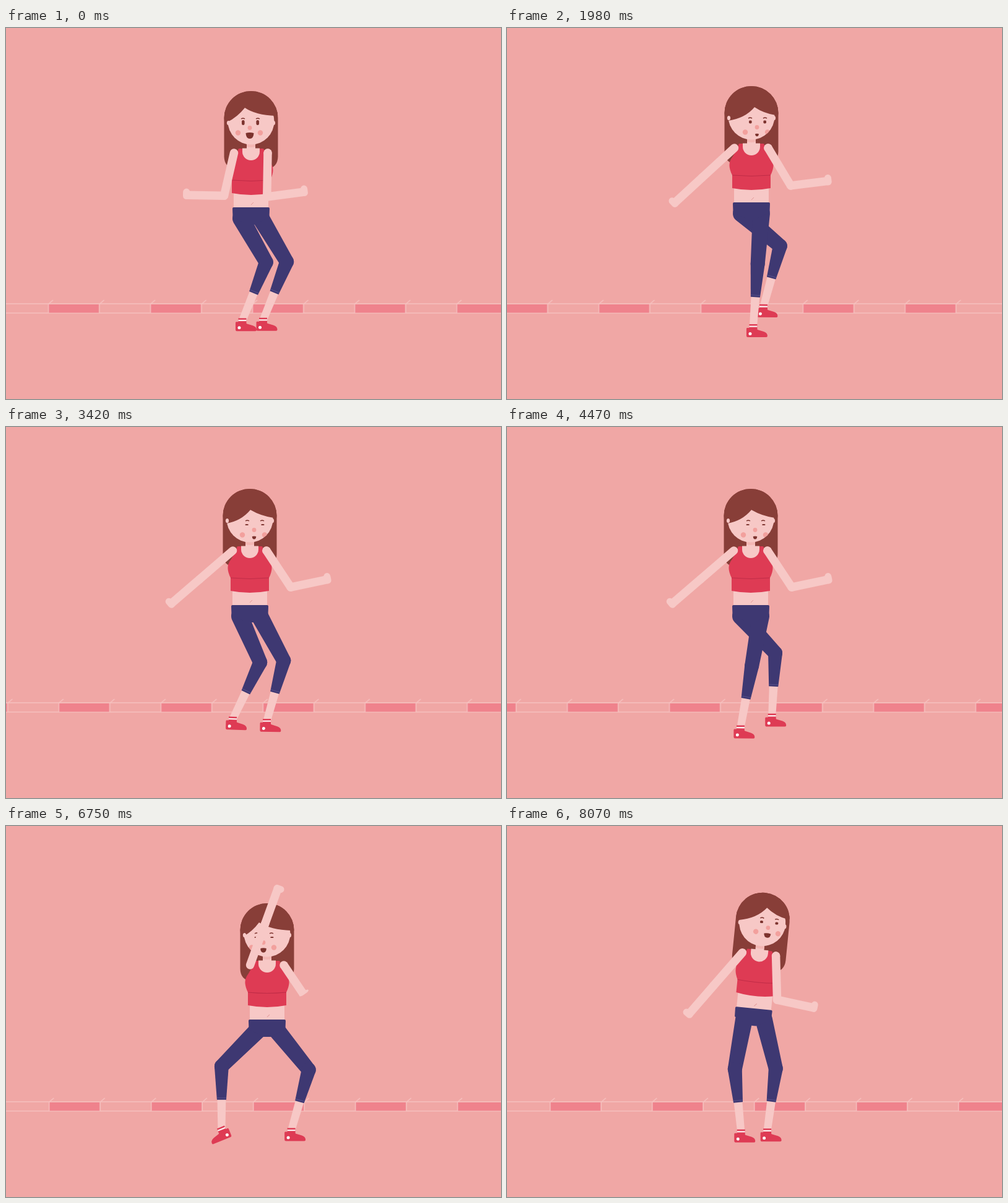
Write an HTML page without scripts that moves like this. It is 800x600 px and loops after 8100 ms.

```html
<!DOCTYPE html>
<html lang="en">
<head>
<meta charset="utf-8">
<title>Street dance</title>
<style>
html, body { margin: 0; width: 100%; height: 100%; overflow: hidden; background: #f0a7a5; }
svg { display: block; width: 100vw; height: 100vh; }
.skin { fill: #f7c8c6; }
.hair { fill: #883e38; }
.red { fill: #de3b54; }
.navy { fill: #3e3872; }
.blush { fill: #f2a09d; }
.dark { fill: #7c332e; }
.limb { fill: none; stroke: #f7c8c6; stroke-width: 13.5; stroke-linecap: round; }
.fist { stroke-width: 11; }
.kerb { fill: none; stroke: #f6c1bf; stroke-width: 1.5; }

.road, .body, .torso, .face, .eyes, .mouth, .fringe,
.armL, .foreL, .armR, .foreR,
.thighL, .shinL, .footL, .thighR, .shinR, .footR { animation: 8100ms linear infinite; }
.body, .torso, .face, .eyes, .mouth, .fringe,
.armL, .foreL, .armR, .foreR { animation-timing-function: ease-in-out; }

.road { animation-name: road; }
.body { animation-name: body; }
.torso { animation-name: torso; }
.face { animation-name: face; }
.eyes { animation-name: eyes; }
.mouth { animation-name: mouth; }
.fringe { animation-name: fringe; }
.armL { animation-name: armL; }
.foreL { animation-name: foreL; }
.armR { animation-name: armR; }
.foreR { animation-name: foreR; }
.thighL { animation-name: thighL; }
.shinL { animation-name: shinL; }
.footL { animation-name: footL; }
.thighR { animation-name: thighR; }
.shinR { animation-name: shinR; }
.footR { animation-name: footR; }

@keyframes road {
  0% { translate: 0 0; }
  5.2% { translate: -1.5px 0; }
  10.4% { translate: -7px 0; }
  15.6% { translate: -25px 0; }
  20.7% { translate: -55px 0; }
  24.44% { translate: -85px 0; }
  28.9% { translate: -132px 0; }
  33.3% { translate: -188px 0; }
  37.8% { translate: -250px 0; }
  42.22% { translate: -313px 0; }
  46.7% { translate: -373px 0; }
  51% { translate: -425px 0; }
  55.19% { translate: -466px 0; }
  58.8% { translate: -485px 0; }
  62.6%, to { translate: -493.8px 0; }
}

/* walk cycle: contact, lift, reach, then the same on the other side */
@keyframes body {
  0%, 10.55% { translate: 396px 290px; }
  5.2% { translate: 396px 297px; }
  12.85%, 22.64%, 32.43%, 42.22%, 52.01%, 61.8% { translate: 394px 288px; }
  14.65%, 24.44%, 34.23%, 44.02%, 53.81% { translate: 395px 282px; }
  16.02%, 25.81%, 35.6%, 45.4%, 55.19% { translate: 394px 288px; }
  17.75%, 27.54%, 37.33%, 47.12%, 56.91% { translate: 394px 288px; }
  19.51%, 29.3%, 39.09%, 48.88%, 58.67% { translate: 395px 282px; }
  20.92%, 30.71%, 40.5%, 50.29%, 60.08% { translate: 394px 288px; }
  68.15%, 75.7% { translate: 414px 326px; }
  83.33% { translate: 422px 313px; }
  93.4% { translate: 411px 280px; }
  99.63%, to { translate: 399px 295px; }
}
@keyframes thighL {
  0%, 10.55% { rotate: -29.8deg; }
  5.2% { rotate: 12deg; }
  12.85%, 22.64%, 32.43%, 42.22%, 52.01%, 61.8% { rotate: -23.5deg; }
  14.65%, 24.44%, 34.23%, 44.02%, 53.81% { rotate: -50deg; }
  16.02%, 25.81%, 35.6%, 45.4%, 55.19% { rotate: -43deg; }
  17.75%, 27.54%, 37.33%, 47.12%, 56.91% { rotate: -34deg; }
  19.51%, 29.3%, 39.09%, 48.88%, 58.67% { rotate: -7deg; }
  20.92%, 30.71%, 40.5%, 50.29%, 60.08% { rotate: 0deg; }
  68.15%, 75.7% { rotate: 56deg; }
  83.33% { rotate: 45deg; }
  93.4% { rotate: 15deg; }
  99.63%, to { rotate: 10.4deg; }
}
@keyframes shinL {
  0%, 10.55% { rotate: 52deg; }
  5.2% { rotate: -21deg; }
  12.85%, 22.64%, 32.43%, 42.22%, 52.01%, 61.8% { rotate: 49.3deg; }
  14.65%, 24.44%, 34.23%, 44.02%, 53.81% { rotate: 65.4deg; }
  16.02%, 25.81%, 35.6%, 45.4%, 55.19% { rotate: 46deg; }
  17.75%, 27.54%, 37.33%, 47.12%, 56.91% { rotate: 34deg; }
  19.51%, 29.3%, 39.09%, 48.88%, 58.67% { rotate: 0deg; }
  20.92%, 30.71%, 40.5%, 50.29%, 60.08% { rotate: 0deg; }
  68.15%, 75.7% { rotate: -64deg; }
  83.33% { rotate: -45deg; }
  93.4% { rotate: -21deg; }
  99.63%, to { rotate: -16deg; }
}
@keyframes footL {
  0%, 10.55% { rotate: -22.2deg; }
  5.2% { rotate: 9deg; }
  12.85%, 22.64%, 32.43%, 42.22%, 52.01% { rotate: -24deg; }
  14.65%, 24.44%, 34.23%, 44.02%, 53.81% { rotate: -15deg; }
  16.02%, 25.81%, 35.6%, 45.4%, 55.19% { rotate: -3deg; }
  17.75%, 27.54%, 37.33%, 47.12%, 56.91% { rotate: 0deg; }
  19.51%, 29.3%, 39.09%, 48.88%, 58.67% { rotate: 7deg; }
  20.92%, 30.71%, 40.5%, 50.29%, 60.08% { rotate: 0deg; }
  61.8% { rotate: -24deg; scale: 1 1; }
  68.15%, 75.7% { rotate: -14deg; scale: -1 1; }
  83.33% { rotate: -22deg; scale: -1 1; }
  93.4% { rotate: 6deg; scale: 1 1; }
  99.63%, to { rotate: 5.5deg; scale: 1 1; }
}
@keyframes thighR {
  0%, 10.55% { rotate: -30.8deg; }
  5.2% { rotate: -14.5deg; }
  12.85%, 22.64%, 32.43%, 42.22%, 52.01%, 61.8% { rotate: -28.7deg; }
  14.65%, 24.44%, 34.23%, 44.02%, 53.81% { rotate: 4deg; }
  16.02%, 25.81%, 35.6%, 45.4%, 55.19% { rotate: 10.2deg; }
  17.75%, 27.54%, 37.33%, 47.12%, 56.91% { rotate: -4deg; }
  19.51%, 29.3%, 39.09%, 48.88%, 58.67% { rotate: -40deg; }
  20.92%, 30.71%, 40.5%, 50.29%, 60.08% { rotate: -36deg; }
  68.15%, 75.7% { rotate: -50.5deg; }
  83.33% { rotate: -39deg; }
  93.4% { rotate: -14deg; }
  99.63%, to { rotate: -13.7deg; }
}
@keyframes shinR {
  0%, 10.55% { rotate: 52.8deg; }
  5.2% { rotate: 21deg; }
  12.85%, 22.64%, 32.43%, 42.22%, 52.01%, 61.8% { rotate: 44.3deg; }
  14.65%, 24.44%, 34.23%, 44.02%, 53.81% { rotate: 0deg; }
  16.02%, 25.81%, 35.6%, 45.4%, 55.19% { rotate: 0deg; }
  17.75%, 27.54%, 37.33%, 47.12%, 56.91% { rotate: 37.6deg; }
  19.51%, 29.3%, 39.09%, 48.88%, 58.67% { rotate: 70deg; }
  20.92%, 30.71%, 40.5%, 50.29%, 60.08% { rotate: 54deg; }
  68.15%, 75.7% { rotate: 68deg; }
  83.33% { rotate: 55deg; }
  93.4% { rotate: 21deg; }
  99.63%, to { rotate: 21.4deg; }
}
@keyframes footR {
  0%, 10.55% { rotate: -22deg; }
  5.2% { rotate: -6.5deg; }
  12.85%, 22.64%, 32.43%, 42.22%, 52.01%, 61.8% { rotate: -15deg; }
  14.65%, 24.44%, 34.23%, 44.02%, 53.81% { rotate: -4deg; }
  16.02%, 25.81%, 35.6%, 45.4%, 55.19% { rotate: -10deg; }
  17.75%, 27.54%, 37.33%, 47.12%, 56.91% { rotate: -31deg; }
  19.51%, 29.3%, 39.09%, 48.88%, 58.67% { rotate: -28deg; }
  20.92%, 30.71%, 40.5%, 50.29%, 60.08% { rotate: -18deg; }
  68.15%, 75.7% { rotate: -17.5deg; }
  83.33% { rotate: -16deg; }
  93.4% { rotate: -7deg; }
  99.63%, to { rotate: -7.7deg; }
}

@keyframes torso {
  0%, 83.33% { rotate: 0deg; }
  93.4% { rotate: 2deg; }
  99.63%, to { rotate: 5.7deg; }
}
@keyframes armL {
  0% { rotate: 13deg; }
  5.2% { rotate: 30deg; }
  10.55% { rotate: 180deg; }
  20.9%, 24.44% { rotate: 47.4deg; }
  42.22%, 61.8% { rotate: 49.3deg; }
  68.15% { rotate: 162.8deg; }
  75.7% { rotate: 136deg; }
  83.33% { rotate: 199.9deg; }
  87.7% { rotate: 100deg; }
  90.5% { rotate: 60deg; }
  93.4% { rotate: 20deg; }
  99.63%, to { rotate: 35.3deg; }
}
@keyframes foreL {
  0% { rotate: 78deg; }
  5.2% { rotate: 50deg; }
  10.55%, 83.33% { rotate: 0deg; }
  87.7% { rotate: 70deg; }
  90.5% { rotate: 90deg; }
  93.4% { rotate: 75deg; }
  99.63%, to { rotate: 0deg; }
}
@keyframes armR {
  0% { rotate: 1deg; }
  10.55% { rotate: -10deg; }
  20.9%, 24.44% { rotate: -31deg; }
  42.22% { rotate: -33.5deg; }
  61.8% { rotate: -33.5deg; scale: 1 1; }
  68.15%, 75.7% { rotate: 18deg; scale: 1 .3; }
  83.33% { rotate: -34deg; scale: 1 .42; }
  86% { scale: 1 1; }
  93.4% { rotate: -180deg; }
  99.63%, to { rotate: -7.3deg; scale: 1 1; }
}
@keyframes foreR {
  0% { rotate: -98.5deg; }
  10.55% { rotate: -110deg; }
  20.9%, 24.44% { rotate: -66deg; }
  42.22%, 61.8% { rotate: -68.5deg; }
  68.15%, 93.4% { rotate: 0deg; }
  96.5% { rotate: -5deg; }
  99.63%, to { rotate: -76.2deg; }
}

@keyframes face {
  0%, 10.55% { translate: -1px -7px; }
  20.9%, 24.44% { translate: 10px 0; }
  42.22%, 61.8% { translate: 8px 0; }
  68.15%, 75.7% { translate: 9.5px -1.5px; }
  83.33% { translate: -5px -3px; }
  99.63%, to { translate: 10.8px -10.5px; }
}
@keyframes eyes {
  0%, 10.55% { scale: 1 1; }
  20.9%, 24.44% { scale: 1 .6; }
  42.22%, 61.8% { scale: 1.1 .23; }
  68.15%, 83.33% { scale: 1.1 .27; }
  99.63%, to { scale: 1.05 .5; }
}
@keyframes mouth {
  0%, 10.55% { scale: 1; }
  20.9%, 24.44% { scale: .45; }
  42.22%, 61.8% { scale: .5; }
  68.15%, 75.7% { scale: .42; }
  83.33% { scale: .75; }
  99.63%, to { scale: .85 .75; }
}
@keyframes fringe {
  0%, 10.55% { d: path("M-50-138H-38Q-22-146-10-161Q8-149 39-148H50V-200H-50Z"); }
  20.9%, 24.44% { d: path("M-50-132H-38Q-10-136 5-154Q20-144 39-141H50V-200H-50Z"); }
  42.22%, 61.8% { d: path("M-50-132H-38Q-14-136 1-154Q18-144 39-141H50V-200H-50Z"); }
  68.15%, 75.7% { d: path("M-50-132H-38Q-11-137 4-155Q20-144 39-141H50V-200H-50Z"); }
  83.33% { d: path("M-50-135H-38Q-24-142-13-157Q6-145 39-144H50V-200H-50Z"); }
  99.63%, to { d: path("M-50-140H-38Q-10-145 5-164Q20-152 39-149H50V-200H-50Z"); }
}
</style>
</head>
<body>
<svg viewBox="0 0 800 600">
  <defs>
    <pattern id="blocks" x="67.7" y="436" width="165" height="30" patternUnits="userSpaceOnUse">
      <rect y="11" width="82.5" height="13.5" fill="#ef828c"/>
      <path class="kerb" d="M.8 25V10.5l7.5-6.5M83.3 25V10.5l7.5-6.5"/>
    </pattern>
    <clipPath id="crown"><circle cy="-144.5" r="43.5"/></clipPath>
    <clipPath id="cheek"><circle cy="-139" r="37.5"/></clipPath>
    <path id="thigh" class="navy" d="M-14 0A14 14 0 0 1 14 0L11.5 81.5A11.5 11.5 0 0 1-11.5 81.5Z"/>
    <g id="shin">
      <path class="skin" d="M-7 48H7L6 103H-6Z"/>
      <path class="navy" d="M-11.5 0A11.5 11.5 0 0 1 11.5 0L7.5 54H-7.5Z"/>
      <path d="M-7.5 51H7.5" stroke="#5b5590" stroke-width=".8"/>
    </g>
    <g id="foot">
      <path class="red" d="M-6.5-4H6.5V4H-6.5Z"/>
      <path fill="#fdeeee" d="M-6.5-1.5H6.5V.8H-6.5Z"/>
      <path class="red" d="M-10 2H5L7 5 17 8Q23 10 23 15 23 17 21 17H-9Q-11 17-11 14V4Q-11 2-10 2Z"/>
      <circle cx="-5" cy="11.5" r="2.5" fill="#fff"/>
    </g>
  </defs>

  <rect width="800" height="600" fill="#f0a7a5"/>
  <path class="kerb" d="M0 446H800M0 461H800"/>
  <g class="road"><rect x="-100" y="436" width="1430" height="30" fill="url(#blocks)"/></g>

  <g class="body">
    <g transform="translate(-16 18)"><g class="thighL">
      <use href="#thigh"/>
      <g transform="translate(0 81.5)"><g class="shinL">
        <use href="#shin"/>
        <g transform="translate(0 102)"><g class="footL"><use href="#foot"/></g></g>
      </g></g>
    </g></g>
    <g transform="translate(16 18)"><g class="thighR">
      <use href="#thigh"/>
      <g transform="translate(0 81.5)"><g class="shinR">
        <use href="#shin"/>
        <g transform="translate(0 102)"><g class="footR"><use href="#foot"/></g></g>
      </g></g>
    </g></g>

    <g class="torso">
      <path class="hair" d="M-43.5-144.5A43.5 43.5 0 0 1 43.5-144.5V-82Q43-65 27-62H-27Q-43-65-43.5-82Z"/>
      <path class="skin" d="M-28-24H28V2H-28Z"/>
      <path d="M0-4l4-4" stroke="#e39a98"/>
      <path class="navy" d="M-28 0H28Q30 0 30 2L29.5 16 6 28H-6L-29.5 16-30 2Q-30 0-28 0Z"/>
      <path class="red" d="M-20-95H20Q26-80 33-70 39-60 31-44V-23Q0-17-31-23V-44Q-39-60-33-70-26-80-20-95Z"/>
      <path d="M-31-44Q0-41 31-44" fill="none" stroke="#c02c47"/>
      <path class="skin" d="M-14-95.5H14V-90A14 14 0 0 1-14-90Z"/>
      <path class="skin" d="M-7-108H7V-92H-7Z"/>
      <path d="M-7-98Q0-96 7-98V-103H-7Z" fill="#f3b7b4"/>

      <circle class="skin" cy="-139" r="37.5"/>
      <path class="hair fringe" clip-path="url(#crown)" d="M-50-138H-38Q-22-146-10-161Q8-149 39-148H50V-200H-50Z"/>
      <ellipse class="skin" cx="-36.5" cy="-136.5" rx="2.6" ry="3.6"/>
      <ellipse class="skin" cx="36.5" cy="-136.5" rx="2.6" ry="3.6"/>
      <g clip-path="url(#cheek)">
        <g class="face">
          <circle class="blush" cx="-20" cy="-113.5" r="4.2"/>
          <circle class="blush" cx="16" cy="-113.5" r="4.2"/>
          <circle class="blush" cx="-1" cy="-121.5" r="3.4"/>
          <path d="M-15-136q3-2 6 0M9-136q3-2 6 0" fill="none" stroke="#7c332e" stroke-width="1.5"/>
          <g transform="translate(0 -130)"><g class="eyes dark">
            <rect x="-14" y="-4" width="4.6" height="8" rx="2.2"/>
            <rect x="9.4" y="-4" width="4.6" height="8" rx="2.2"/>
          </g></g>
          <g transform="translate(-1 -109)"><path class="mouth dark" d="M-6.5-4Q0-6 6.5-4 6 5 0 5-6 5-6.5-4Z"/></g>
        </g>
      </g>

      <g transform="translate(27 -88)">
        <circle class="skin" r="6.75"/>
        <g class="armR">
          <path class="limb" d="M0 0V71"/>
          <g transform="translate(0 71)"><g class="foreR">
            <path class="limb" d="M0 0V59"/>
            <path class="limb fist" d="M-1.5 61H5"/>
          </g></g>
        </g>
      </g>
      <g transform="translate(-27.5 -88)"><g class="armL">
        <path class="limb" d="M0 0V71"/>
        <g transform="translate(0 71)"><g class="foreL">
          <path class="limb" d="M0 0V59"/>
          <path class="limb fist" d="M1.5 61H-5"/>
        </g></g>
      </g></g>
    </g>
  </g>
</svg>
</body>
</html>
```
